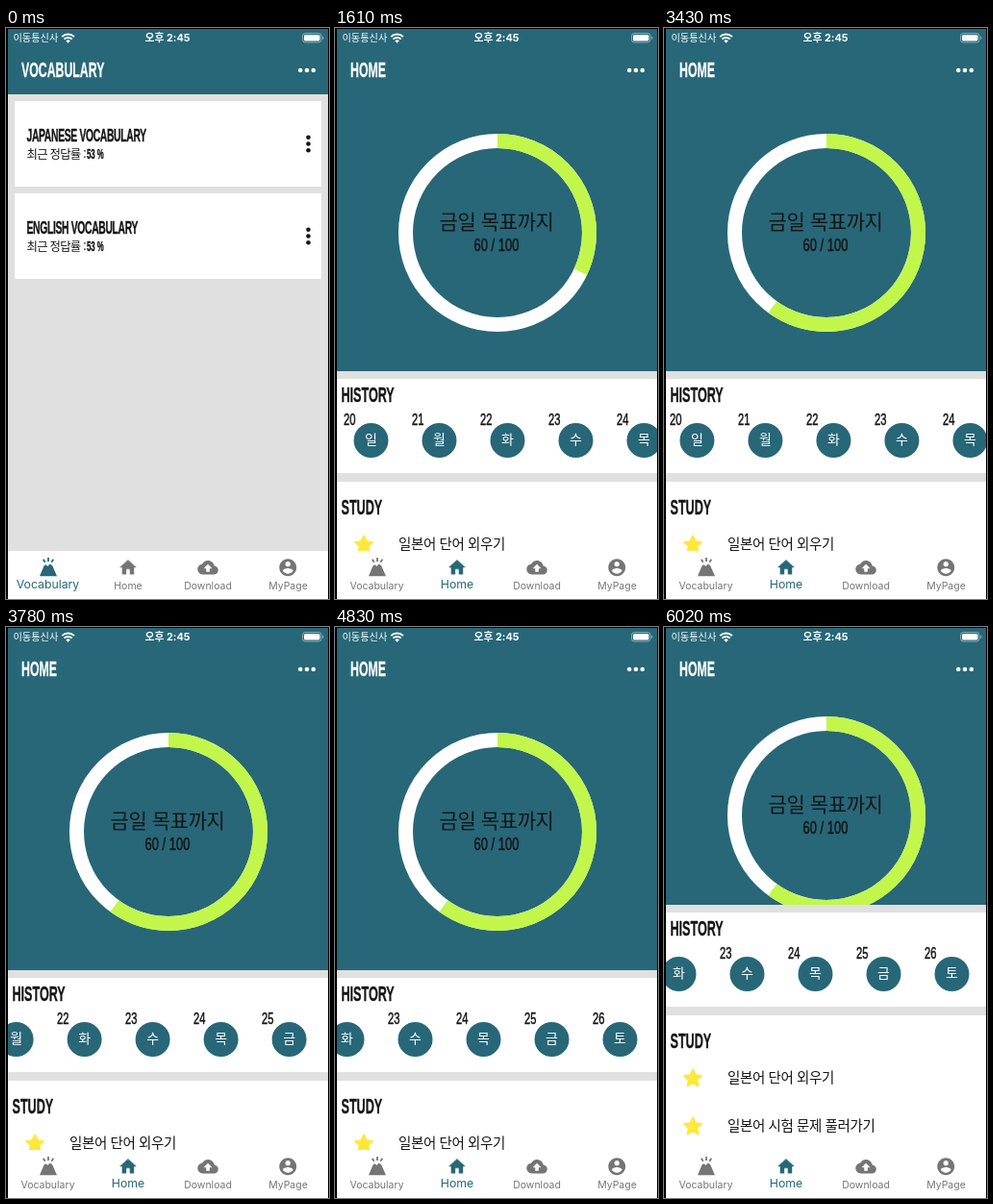
Write an HTML page that moves like this. It is 336 px wide and 594 px high and loops after 8.82 s.

```html
<!DOCTYPE html>
<html lang="ko">
<head>
<meta charset="utf-8">
<title>Vocabulary app</title>
<style>
html, body { margin: 0; width: 100%; height: 100%; overflow: hidden; background: #000; }
svg { display: block; width: 336px; height: 594px; }
:root { --teal: #276778; --grey: #757575; --line: #e0e0e0; --ink: #151515; }

text { font-family: "Noto Sans CJK KR", "Noto Sans CJK JP", sans-serif; white-space: pre; }
.mid { text-anchor: middle; }
.cap, .num { font-family: "Liberation Sans", Arial, sans-serif; transform-box: fill-box; transform-origin: left; }
.cap { font-weight: 700; transform: scaleX(.56); stroke: currentColor; stroke-width: .35px; }
.num { transform: scaleX(.7); stroke: currentColor; stroke-width: .5px; }
.num.mid { transform-origin: center; }
.light { fill: #fff; color: #fff; }
.dark { fill: var(--ink); color: var(--ink); }
.title { font-size: 22px; }
.head { font-size: 22.5px; }
.card { font-size: 18.5px; letter-spacing: -.6px; }
.note { font-size: 12.4px; font-weight: 500; letter-spacing: -.75px; }
.item { font-size: 14.5px; font-weight: 500; letter-spacing: -.4px; }
.clock { font: 700 10.8px Inter, "Noto Sans CJK KR", sans-serif; }

.home, .ring, .days, .scroll, .tab.v, .tab.h, .tab.v text, .tab.h text, .ripple {
  animation: 8.82s linear infinite;
}
.home { animation-name: open; animation-timing-function: step-end; }
.ring { animation-name: fill; stroke-dasharray: 60 100; }
.days { animation-name: swipe; }
.scroll { animation-name: scroll; animation-timing-function: step-end; --k: 1; }
.slow { --k: .25; }

.tab { fill: var(--grey); }
.tab text { font: 10.5px Inter, sans-serif; text-anchor: middle; transform-box: fill-box; transform-origin: bottom; }
.tab.v { animation-name: dim; }
.tab.h { animation-name: light; }
.tab.v text { animation-name: shrink; }
.tab.h text { animation-name: grow; }
.ripple { animation-name: ripple; transform-box: fill-box; transform-origin: center; }

@keyframes open { 0% { visibility: hidden } 9.523%, 100% { visibility: visible } }
@keyframes fill {
  0%, 9.297% { stroke-dashoffset: 60; animation-timing-function: cubic-bezier(0, 0, .58, 1) }
  33.56%, 100% { stroke-dashoffset: 0 }
}
@keyframes swipe {
  0%, 38.095% { transform: none; animation-timing-function: cubic-bezier(.4, 0, .6, 1) }
  46.826% { transform: translateX(-169.5px); animation-timing-function: ease-out }
  48.413% { transform: translateX(-174px) }
  50%, 50.794% { transform: translateX(-175px) }
  54.762% { transform: translateX(-167px); animation-timing-function: ease-out }
  57.937%, 100% { transform: translateX(-164px) }
}
@keyframes scroll {
  0% { transform: none }
  61.904% { transform: translateY(calc(var(--k) * -12px)) }
  62.698% { transform: translateY(calc(var(--k) * -38px)) }
  63.492% { transform: translateY(calc(var(--k) * -62px)) }
  68.253%, 100% { transform: translateY(calc(var(--k) * -68px)) }
}
@keyframes dim {
  0%, 9.523% { fill: #276778 }
  9.524% { fill: #536b71 }
  10.317%, 100% { fill: #757575 }
}
@keyframes light {
  0%, 9.523% { fill: #757575 }
  9.524% { fill: #3a6a77 }
  10.317%, 100% { fill: #276778 }
}
@keyframes shrink {
  0%, 9.523% { transform: scale(1.17) }
  9.524% { transform: scale(1.05) }
  10.317%, 100% { transform: none }
}
@keyframes grow {
  0%, 9.523% { transform: none }
  9.524% { transform: scale(1.13) }
  10.317%, 100% { transform: scale(1.17) }
}
@keyframes ripple {
  0%, 9.523% { opacity: 0; transform: none }
  9.524% { opacity: .075; transform: none }
  14.286%, 100% { opacity: 0; transform: scale(1.35) }
}
</style>
</head>
<body>
<svg viewBox="0 0 336 594">
  <defs>
    <clipPath id="screen"><rect x="2" y="1" width="333" height="593"/></clipPath>
    <clipPath id="bar"><rect x="2" y="543" width="333" height="49.5"/></clipPath>
    <g id="dots"><circle cx="-6.8" r="2.3"/><circle r="2.3"/><circle cx="6.8" r="2.3"/></g>
    <path id="star" d="M0-9 2.7-3.3 8.8-2.6 4.3 1.6 5.5 7.8 0 4.7-5.5 7.8-4.3 1.6-8.8-2.6-2.7-3.3Z"
      fill="#ffe83d" stroke="#ffe83d" stroke-width="2" stroke-linejoin="round"/>
  </defs>

  <g clip-path="url(#screen)">
    <!-- word lists -->
    <rect width="336" height="594" fill="#e0e0e0"/>
    <rect width="336" height="69" fill="#276778"/>
    <text class="cap title light" x="16" y="51.5">VOCABULARY</text>
    <g id="cards"></g>

    <!-- home -->
    <g class="home">
      <rect width="336" height="594" fill="#276778"/>
      <text class="cap title light" x="16" y="51.5">HOME</text>
      <g class="scroll slow">
        <g fill="none" stroke-width="15" transform="rotate(-90 169 213)">
          <circle cx="169" cy="213" r="95.5" stroke="#fff"/>
          <circle class="ring" cx="169" cy="213" r="95.5" stroke="#c2f64b" pathLength="100"/>
        </g>
        <text class="mid dark" x="168" y="208.5" font-size="21" font-weight="500" letter-spacing="-.4">금일 목표까지</text>
        <text class="num mid dark" x="168" y="232" font-size="18.5">60 / 100</text>
      </g>
      <g class="scroll">
        <rect y="357" width="336" height="320" fill="#e0e0e0"/>
        <rect y="365" width="336" height="98" fill="#fff"/>
        <rect y="472" width="336" height="205" fill="#fff"/>
        <text class="cap head dark" x="6.5" y="389">HISTORY</text>
        <g class="days" id="days"></g>
        <text class="cap head dark" x="6.5" y="506">STUDY</text>
        <use href="#star" x="30" y="537.5"/>
        <text class="item dark" x="66" y="542">일본어 단어 외우기</text>
        <use href="#star" x="30" y="587.5"/>
        <text class="item dark" x="66" y="592">일본어 시험 문제 풀러가기</text>
      </g>
    </g>
    <use href="#dots" x="313" y="44" fill="#fff"/>

    <!-- status bar -->
    <g fill="#fff">
      <text x="7.5" y="14" font-size="10.2">이동통신사</text>
      <g fill="none" stroke="#fff" stroke-width="1.9">
        <path d="M58.2 9.2a9 9 0 0 1 12.8 0M60.5 11.7a5.8 5.8 0 0 1 8.2 0"/>
      </g>
      <path d="M62.4 13.4a3.2 3.2 0 0 1 4.4 0L64.6 15.8Z"/>
      <text class="clock mid" x="168" y="14">오후 2:45</text>
      <rect x="308.5" y="5.5" width="19.5" height="9.5" rx="2.8" fill="none" stroke="#fff" stroke-opacity=".45"/>
      <rect x="310" y="7" width="16.5" height="6.5" rx="1.6"/>
      <path d="M329.2 8.6a1.8 1.8 0 0 1 0 3.4Z" opacity=".5"/>
    </g>

    <!-- tabs -->
    <rect y="544" width="336" height="50" fill="#fff"/>
    <g clip-path="url(#bar)"><circle class="ripple" cx="127" cy="567.5" r="31"/></g>
    <g class="tab v">
      <path d="M35 570.3 39.6 559.2 41.6 558.2 43.4 560 45.6 557.6 48.2 559.2 53 570.3Z"/>
      <path d="M44 551v4M38.6 552.6l2 3M49.4 552.6l-2 3" stroke="#fff" stroke-width="0"/>
      <path d="M43.1 551h1.8v4h-1.8ZM38 553.2l1.5-.9 1.9 3-1.5.9ZM50 553.2l-1.5-.9-1.9 3 1.5.9Z"/>
      <text x="43.5" y="583.8">Vocabulary</text>
    </g>
    <g class="tab h">
      <path transform="translate(116.2 550.5) scale(.896)" d="M10 20v-6h4v6h5v-8h3L12 3 2 12h3v8z"/>
      <text x="127" y="583.8">Home</text>
    </g>
    <g class="tab">
      <path transform="translate(199.3 550.5) scale(.896)" d="M19.35 10.04C18.67 6.59 15.64 4 12 4 9.11 4 6.6 5.64 5.35 8.04 2.34 8.36 0 10.91 0 14c0 3.31 2.69 6 6 6h13c2.76 0 5-2.24 5-5 0-2.64-2.05-4.78-4.65-4.96zM14 13v4h-4v-4H7l5-5 5 5h-3z"/>
      <text x="210" y="583.8">Download</text>
    </g>
    <g class="tab">
      <path transform="translate(282.5 550.5) scale(.896)" d="M12 2C6.48 2 2 6.48 2 12s4.48 10 10 10 10-4.48 10-10S17.52 2 12 2zm0 3c1.66 0 3 1.34 3 3s-1.34 3-3 3-3-1.34-3-3 1.34-3 3-3zm0 14.2c-2.5 0-4.71-1.28-6-3.22.03-1.99 4-3.08 6-3.08 1.99 0 5.97 1.09 6 3.08-1.29 1.94-3.5 3.22-6 3.22z"/>
      <text x="293.5" y="583.8">MyPage</text>
    </g>
  </g>
</svg>
<script>
const fill = (id, items, draw) => {
  document.getElementById(id).innerHTML = items.map(draw).join('');
};

fill('cards', ['JAPANESE', 'ENGLISH'], (name, i) => `
  <g transform="translate(0 ${i * 96})">
    <rect x="9" y="76" width="319" height="89" fill="#fff"/>
    <text class="cap card dark" x="21.5" y="118.5">${name} VOCABULARY</text>
    <text class="note dark" x="21.5" y="135.5">최근 정답률 :</text>
    <text class="cap dark" x="84" y="136" font-size="14">53 %</text>
    <use href="#dots" class="dark" transform="translate(314.5 120.5) rotate(90)"/>
  </g>`);

fill('days', [...'일월화수목금토'], (day, i) => `
  <g transform="translate(${i * 71} 0)">
    <text class="num dark" x="9" y="413" font-size="16">${20 + i}</text>
    <circle cx="37.5" cy="429" r="18" fill="#276778"/>
    <text class="mid light" x="37.5" y="433" font-size="14" font-weight="500">${day}</text>
  </g>`);
</script>
</body>
</html>
```
